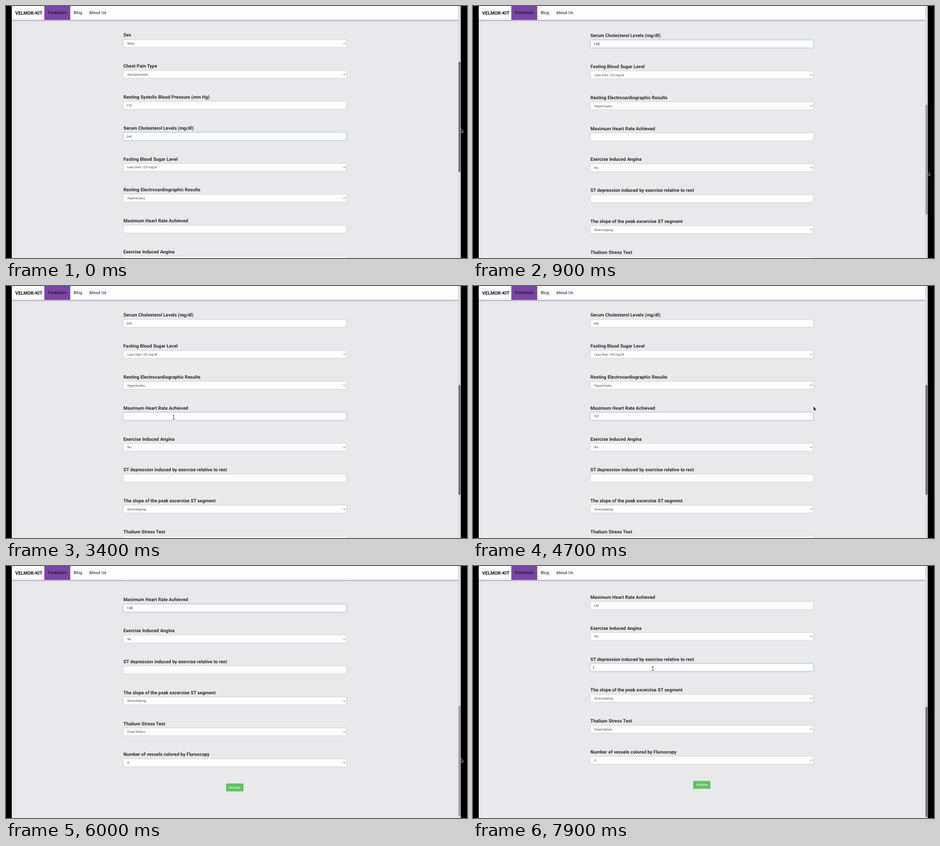
An HTML page with a canvas that plays this animation: 800 px wide and 438 px high, repeating every 8000 ms.

```html
<!DOCTYPE html>
<html lang="en">
<head>
<meta charset="utf-8">
<title>Prediction form</title>
<style>
  html, body { margin: 0; width: 100%; height: 100%; overflow: hidden; background: #000; }
  canvas { display: block; }
</style>
</head>
<body>
<canvas id="stage" width="800" height="438"></canvas>
<script>
const ctx = document.getElementById('stage').getContext('2d');
ctx.textRendering = 'geometricPrecision';

const LOOP = 8000, STEP = 100, BLINK = 910;
const LEFT = 203.8, WIDTH = 386.8, BOX = 13.7;
const FIRST_LABEL = 50.5, PITCH = 53.8, LABEL_TO_BOX = 14.6;
const BODY = 5.64, NAV = 7.3, HEADING = 8.06;

const SELECTS = {
  'Sex': 'Male',
  'Chest Pain Type': 'Asymptomatic',
  'Fasting Blood Sugar Level': 'Less than 120 mg/dl',
  'Resting Electrocardiographic Results': 'Hypertrophy',
  'Exercise Induced Angina': 'No',
  'The slope of the peak excercise ST segment': 'Downsloping',
  'Thalium Stress Test': 'Fixed Defect',
  'Number of vessels colored by Fluroscopy': '0'
};
const PRESSURE = 'Resting Systolic Blood Pressure (mm Hg)';
const SERUM = 'Serum Cholesterol Levels (mg/dl)';
const HEART_RATE = 'Maximum Heart Rate Achieved';
const ST_DEPRESSION = 'ST depression induced by exercise relative to rest';
const [SEX, PAIN, SUGAR, ECG, ...REST] = Object.keys(SELECTS);
const [ANGINA, ...LAST] = REST;
const LABELS = [SEX, PAIN, PRESSURE, SERUM, SUGAR, ECG, HEART_RATE, ANGINA, ST_DEPRESSION, ...LAST];

const DRAG_1 = [15, 905], DRAG_2 = [5450, 6016];
const CLICK_HEART = 2900, TYPE_START = 3700, TYPE_END = 4100, CLICK_ST = 7600;
// Pointer moves: time span and destination
const MOVES = [
  [DRAG_1, 789, 288],
  [[1400, 2200], 308, 219],
  [[2400, 2700], 291, 228],
  [[4450, 4700], 591, 209.5],
  [[4700, 5400], 789, 263],
  [DRAG_2, 789, 336],
  [[6300, 7400], 312, 178]
];

const ramp = (t, [start, end]) => Math.min(1, Math.max(0, (t - start) / (end - start)));
const within = (t, [start, end], slack) => t >= start && t < end + slack;

function pointerAt(t) {
  return MOVES.reduce(([x, y], [span, toX, toY]) => {
    const k = ramp(t, span);
    return [x + (toX - x) * k, y + (toY - y) * k];
  }, [789, 213]);
}

function rect(x, y, w, h, color) {
  ctx.fillStyle = color;
  ctx.fillRect(x, y, w, h);
}

function pill(x, y, w, h, color) {
  ctx.beginPath();
  ctx.roundRect(x, y, w, h, 1.6);
  ctx.fillStyle = color;
  ctx.fill();
}

function text(str, x, y, size, color, weight = 400) {
  ctx.font = `${weight} ${size}px Roboto, sans-serif`;
  ctx.fillStyle = color;
  ctx.fillText(str, x, y);
}

function drawBox(y, focused) {
  ctx.save();
  if (focused) {
    ctx.shadowColor = 'rgba(102,175,233,.4)';
    ctx.shadowBlur = 3;
  }
  pill(LEFT, y - BOX / 2, WIDTH, BOX, '#fdfdfe');
  ctx.restore();
  ctx.strokeStyle = focused ? '#8cbce6' : '#c6c6c9';
  ctx.lineWidth = 0.6;
  ctx.stroke();
}

function drawChevron(x, y) {
  ctx.beginPath();
  ctx.moveTo(x - 1.6, y - 0.8);
  ctx.lineTo(x, y + 0.8);
  ctx.lineTo(x + 1.6, y - 0.8);
  ctx.strokeStyle = '#444';
  ctx.lineWidth = 0.8;
  ctx.stroke();
}

function drawField(label, labelY, value, focused, caretOn) {
  const y = labelY + LABEL_TO_BOX;
  const isSelect = label in SELECTS;
  const x = isSelect ? 210.4 : 208.9;
  text(label, LEFT, labelY + 2.9, HEADING, '#2e2e30', 700);
  drawBox(y, focused);
  text(value, x, y + 2, BODY, '#555');
  if (isSelect) drawChevron(587, y);
  if (focused && caretOn) rect(x + ctx.measureText(value).width, y - 3.2, 0.6, 6.4, '#333');
}

function drawNav() {
  ctx.save();
  ctx.shadowColor = 'rgba(85,50,150,.7)';
  ctx.shadowBlur = 3;
  ctx.shadowOffsetY = 0.8;
  rect(10, -6, 774.8, 30, '#fefdff');
  ctx.restore();
  rect(66.5, 0, 45, 24, '#7b45a4');
  text('VELMOR-KIT', 16, 14.6, HEADING, '#111', 700);
  text('Prediction', 72.4, 14.2, NAV, '#111');
  text('Blog', 117.4, 14.2, NAV, '#111');
  text('About Us', 144.2, 14.2, NAV, '#111');
}

function drawScrollbar(scroll, dragging) {
  rect(784.8, 0, 4.4, 438, '#dcdbdd');
  pill(785.4, 97 + 0.463 * scroll, 3, 191.5, dragging ? '#979698' : '#666567');
}

function drawPointer(x, y, overText) {
  if (overText) {
    rect(x - 0.4, y - 3.5, 0.8, 7, '#222');
    rect(x - 1.5, y - 3.8, 3, 0.7, '#222');
    rect(x - 1.5, y + 3.1, 3, 0.7, '#222');
    return;
  }
  const arrow = new Path2D(`M${x} ${y}v6.6l1.5-1.3 1.1 2.5 1.1-.5-1.1-2.4h2.1z`);
  ctx.strokeStyle = '#eee';
  ctx.lineWidth = 1;
  ctx.stroke(arrow);
  ctx.fillStyle = '#222';
  ctx.fill(arrow);
}

function draw(t) {
  const scroll = 161.5 * ramp(t, DRAG_1) + 157.8 * ramp(t, DRAG_2);
  const dragging = within(t, DRAG_1, 200) || within(t, DRAG_2, 200);
  const [px, py] = pointerAt(t);
  const focus = t < CLICK_HEART ? SERUM : t < CLICK_ST ? HEART_RATE : ST_DEPRESSION;
  const typedLength = t < TYPE_START ? 0 : 1 + Math.floor((t - TYPE_START) / 200);
  const values = { ...SELECTS, [PRESSURE]: '170', [SERUM]: '240', [HEART_RATE]: '140'.slice(0, typedLength) };
  // Releasing the thumb, clicking or typing restarts the blink
  const blinkStart = [-460, 1250, CLICK_HEART, TYPE_END, CLICK_ST].filter(start => start <= t).pop();
  const caretOn = (t - blinkStart) % BLINK < BLINK / 2;
  let overText = false;

  rect(0, 0, 800, 438, '#000');
  rect(10, 0, 779, 438, '#e9e8ea');
  LABELS.forEach((label, i) => {
    const y = FIRST_LABEL + i * PITCH - scroll;
    drawField(label, y, values[label] || '', label === focus, caretOn);
    const inside = px > LEFT && px < LEFT + WIDTH && Math.abs(py - y - LABEL_TO_BOX) < BOX / 2;
    if (inside && !(label in SELECTS)) overText = true;
  });
  pill(382, 692.9 - scroll, 30, BOX, '#5fc462');
  text('Analyze', 387.2, 701.7 - scroll, BODY, '#fff');

  drawNav();
  drawScrollbar(scroll, dragging);
  const hiddenByTyping = t >= TYPE_START && t < 4500;
  if (!hiddenByTyping) drawPointer(px, py, overText);
}

function tick() {
  draw(Math.floor(performance.now() % LOOP / STEP) * STEP);
  requestAnimationFrame(tick);
}
tick();
</script>
</body>
</html>
```
